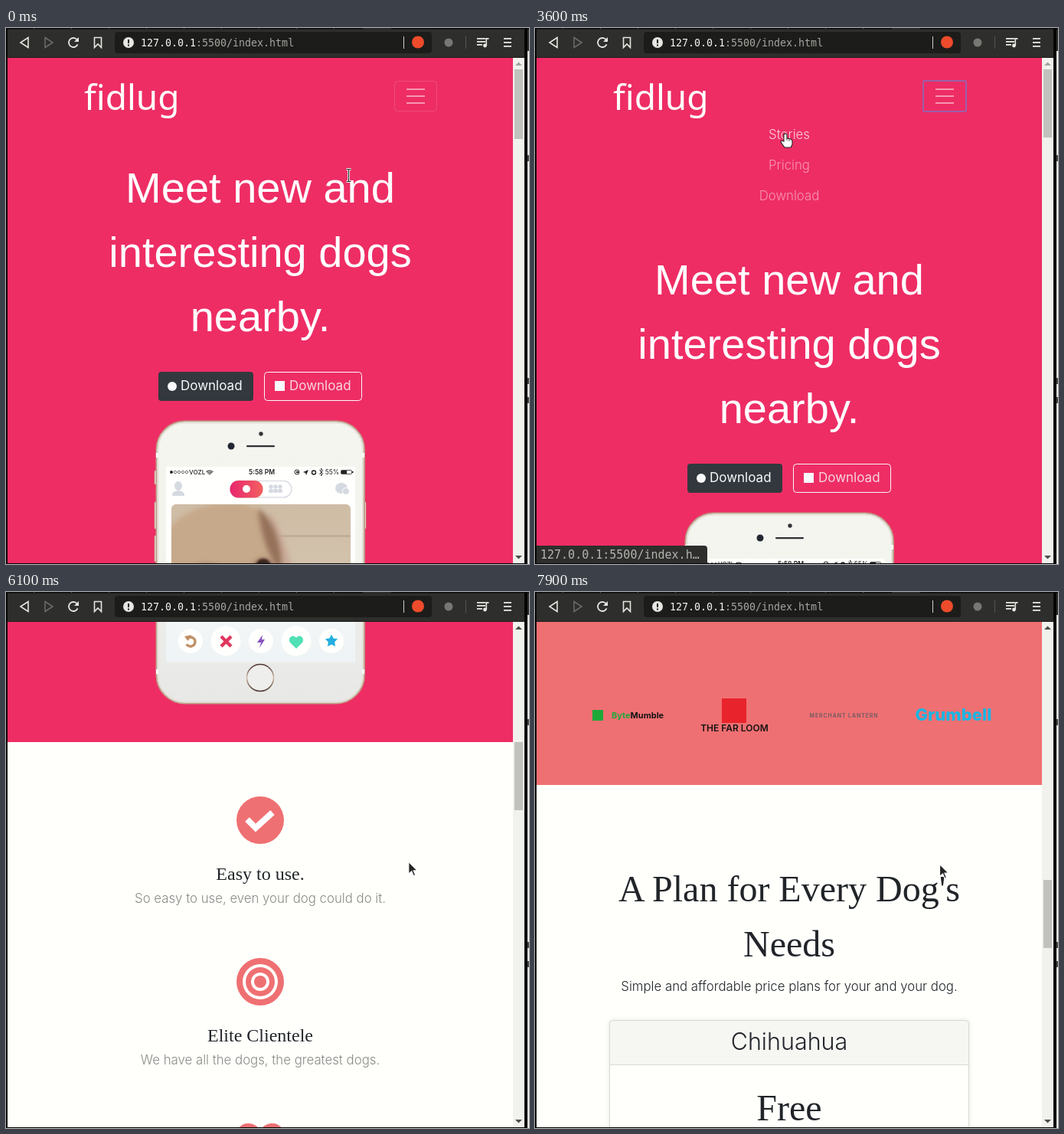
Animation of 683x700 px, one loop 8 s. Source, as an HTML page with a canvas:

```html
<!DOCTYPE html>
<html lang="en">
<head>
<meta charset="utf-8">
<title>Dog landing page</title>
<style>
html, body { margin: 0; width: 683px; height: 700px; overflow: hidden; background: #000; }
canvas { display: block; }
</style>
</head>
<body>
<canvas id="stage" width="683" height="700"></canvas>
<script>
const ctx = document.getElementById('stage').getContext('2d');
const LOOP = 8000, STEP = 100, MID = 332;
const PINK = '#ee2d65', CORAL = '#ef7072', PAPER = '#fffffb', INK = '#212529';
const SANS = 'Inter, sans-serif', SERIF = '"Liberation Serif", serif', MONO = '"DejaVu Sans Mono", monospace';
const BODY = '300 16.8px ' + SANS;

// Keyframes are [time, ...values].
const SCROLL = [[3900, 0], [4400, 150], [4500, 150], [4700, 209], [5600, 760], [5700, 790],
  [5800, 790], [6700, 1539], [7300, 2010], [7500, 2010], [7900, 2367]];
const MENU = [[1200, 0], [1300, 32], [1400, 94], [1500, 120]];
const POINTER = [[300, 447, 192], [400, 456, 172], [500, 456, 172], [700, 490, 130], [900, 519, 97],
  [2200, 519, 97], [2300, 425, 142], [2400, 330, 186], [2500, 330, 186], [2800, 400, 205],
  [3000, 475, 212], [3200, 400, 180], [3400, 345, 150], [3600, 327, 138], [3700, 327, 138],
  [3900, 400, 222], [4200, 470, 312], [4700, 482, 331], [5600, 523, 349], [6700, 528, 355]];

function track(keys, t) {
  const i = keys.findIndex(k => k[0] > t);
  if (i === 0) return keys[0].slice(1);
  if (i < 0) return keys[keys.length - 1].slice(1);
  const a = keys[i - 1], b = keys[i], p = (t - a[0]) / (b[0] - a[0]);
  return a.slice(1).map((v, n) => v + (b[n + 1] - v) * p);
}

function rect(x, y, w, h, fill, r = 0, stroke, lw = 1) {
  ctx.beginPath();
  ctx.roundRect(x, y, w, h, r);
  paint(fill, stroke, lw);
}
function oval(x, y, rx, fill, ry = rx, turn = 0, stroke, lw = 1) {
  ctx.beginPath();
  ctx.ellipse(x, y, rx, ry, turn, 0, Math.PI * 2);
  paint(fill, stroke, lw);
}
function poly(points, fill, stroke, lw = 1, open = false) {
  ctx.beginPath();
  for (let i = 0; i < points.length; i += 2) ctx.lineTo(points[i], points[i + 1]);
  if (!open) ctx.closePath();
  paint(fill, stroke, lw);
}
function shape(path, x, y, fill, stroke, lw = 1) {
  ctx.save();
  ctx.translate(x, y);
  const p = new Path2D(path);
  if (fill) { ctx.fillStyle = fill; ctx.fill(p); }
  if (stroke) { ctx.strokeStyle = stroke; ctx.lineWidth = lw; ctx.stroke(p); }
  ctx.restore();
}
function paint(fill, stroke, lw) {
  if (fill) { ctx.fillStyle = fill; ctx.fill(); }
  if (stroke) { ctx.strokeStyle = stroke; ctx.lineWidth = lw; ctx.stroke(); }
}
function text(str, x, y, font, color, align = 'center', spacing = 0) {
  ctx.font = font;
  ctx.fillStyle = color;
  ctx.textAlign = align;
  ctx.textRendering = 'optimizeLegibility'; // kerns across spaces too
  ctx.letterSpacing = spacing + 'px';
  ctx.fillText(str, x, y);
  ctx.letterSpacing = '0px';
}
function fade(y0, y1, ...colors) {
  const g = ctx.createLinearGradient(0, y0, 0, y1);
  colors.forEach((c, i) => g.addColorStop(i / (colors.length - 1), c));
  return g;
}

function drawNav(t, menu, hover) {
  text('fidlug', 102, 107, '46px "Noto Sans", sans-serif', PAPER, 'left');
  const focused = t >= 1100;
  if (focused) rect(507, 69, 56, 40, null, 2, '#9a5fa8', 2);
  else rect(507.5, 69.5, 55, 39, null, 4, 'rgba(255,255,255,.14)');
  for (const y of [79, 88, 97]) rect(523, y, 24, 2, 'rgba(255,255,255,.5)');
  if (!menu) return;
  ctx.save();
  ctx.beginPath();
  ctx.rect(90, 119, 480, menu);
  ctx.clip();
  ['Stories', 'Pricing', 'Download'].forEach((label, i) =>
    text(label, MID, 145 + i * 40, BODY, `rgba(255,255,255,${i === hover ? .78 : .5})`));
  ctx.restore();
}

function drawHero() {
  ['Meet new and', 'interesting dogs', 'nearby.'].forEach((line, i) =>
    text(line, MID, 348 + i * 84, '56px "Liberation Sans", sans-serif', '#fff'));
  rect(199, 569, 124, 38, '#32383e', 4);
  oval(217, 588, 6, '#f8f9fa');
  text('Download', 228, 593, '17px ' + SANS, '#f8f9fa', 'left');
  rect(337.5, 569.5, 127, 37, null, 4, '#f8f9fa');
  rect(351, 581, 13, 13, '#f8f9fa');
  text('Download', 370, 593, '17px ' + SANS, '#f8d5df', 'left');
}

function drawPhoto() {
  ctx.save();
  ctx.beginPath();
  ctx.roundRect(216, 109, 234, 335, 6);
  ctx.clip();
  rect(216, 109, 234, 335, fade(109, 444, '#cfbca5', '#d6c8b4', '#d0c1ac'));
  rect(340, 149, 110, 3, '#c2ae96');
  ctx.filter = 'blur(3px)';
  shape('M276 270C284 310 268 370 280 460H424C425 390 405 330 382 285Z', 0, 0, '#ba9985');
  shape('M312 345C318 380 306 410 318 460L304 460C300 410 308 380 312 345Z', 0, 0, '#a07d6b');
  shape('M342 120C356 130 364 165 377 200C402 235 408 275 396 306C375 310 360 270 352 230Z', 0, 0, '#c8a796');
  shape('M205 155C222 112 290 96 330 116C354 140 360 190 354 235C362 270 345 296 322 290C296 293 270 280 248 250C235 235 225 230 205 225Z',
    0, 0, '#c6a88a');
  shape('M329 115C346 125 363 160 359 198C345 180 334 155 329 115Z', 0, 0, '#95715a');
  oval(310, 222, 20, '#d0b498', 30, -.3);
  oval(262, 205, 25, '#97765f', 18);
  oval(336, 194, 14, '#8f6c57', 14);
  oval(330, 278, 19, '#72564b', 13);
  oval(332, 339, 27, 'rgba(181,121,112,.4)', 22);
  ctx.filter = 'blur(1.5px)';
  oval(263, 203, 16, '#38241f', 13);
  oval(336, 191, 10, '#3b2620', 11);
  oval(331, 260, 20, '#35282a', 17, -.3);
  oval(324, 254, 7, '#62504f', 3);
  ctx.filter = 'none';
  rect(216, 372, 234, 72, fade(372, 444, 'rgba(40,38,36,0)', 'rgba(40,38,36,.28)', 'rgba(40,38,36,.82)'));
  ctx.restore();
}

function drawStatusLine() {
  for (let i = 0; i < 5; i++) oval(216 + i * 5, 67, 1.7, i ? null : '#222', 1.7, 0, '#333', .7);
  text('VOZL', 239, 70, '500 8px ' + SANS, '#222', 'left');
  for (const r of [2, 4, 6]) {
    ctx.beginPath();
    ctx.arc(266, 71, r, -2.4, -.75);
    paint(null, '#222', 1.2);
  }
  text('5:58 PM', 334, 70, '600 8.5px ' + SANS, '#222');
  oval(380, 67, 3, null, 3, 0, '#222');
  rect(379, 66, 3, 2, '#222');
  poly([388, 67, 395, 64, 392, 71, 391, 68], '#222');
  oval(402, 67.5, 2.5, null, 2.5, 0, '#222', 1.4);
  poly([409, 64, 414, 69, 411.5, 72, 411.5, 62, 414, 65, 409, 70], null, '#222', .8, true);
  text('55%', 426, 70, '8.5px ' + SANS, '#222');
  rect(437.5, 64.5, 14, 5, null, 1, '#222', .8);
  rect(438, 65, 7, 4, '#222');
  rect(452, 66, 1.5, 2, '#222');
}

function drawPhoneButtons() {
  for (let i = 0; i < 5; i++) oval(241 + i * 46, 471, i % 2 ? 19.5 : 16, '#fffffd');
  ctx.beginPath();
  ctx.arc(241, 472, 6, -2.6, 2.6);
  paint(null, '#c09065', 3.4);
  poly([233, 465, 242, 463, 238, 471], '#c09065');
  poly([281, 465, 294, 478], null, '#e0375e', 4.4, true);
  poly([294, 465, 281, 478], null, '#e0375e', 4.4, true);
  poly([335, 463, 328, 473, 333, 473, 331, 480, 338, 469, 334, 469], '#8854c0');
  shape('M0 9L-8 1C-12-5-4-11 0-5C4-11 12-5 8 1Z', 379, 472, '#4fe0b4');
  const star = [];
  for (let i = 0; i < 10; i++) {
    const a = i * Math.PI / 5, r = i % 2 ? 4.4 : 8.5;
    star.push(425 + Math.sin(a) * r, 471 - Math.cos(a) * r);
  }
  poly(star, '#22afe0');
}

function drawPhone() {
  ctx.save();
  ctx.translate(0, 633);
  for (const [x, y, h] of [[194, 65, 18], [194, 106, 35], [194, 150, 34], [467, 106, 35]])
    rect(x, y, 3, h, '#e8ded0', 1, '#b99c88', .5);
  rect(196.5, .5, 271.5, 552, '#f3f3ee', 37, '#c0a08a', 2);
  rect(198.5, 2.5, 267.5, 548, fade(0, 550, '#f5f5f0', '#f3f3ee', '#e8e9e7'), 35, '#e3e0d9', 2);
  for (const x of [196, 465]) {
    rect(x, 42, 3, 6, '#fff');
    rect(x, 508, 3, 6, '#fff');
  }
  oval(333, 17, 2.7, '#343438');
  oval(294, 33, 4.5, '#232733');
  rect(314, 32, 37, 2.2, '#303034', 1);
  rect(209, 60, 247, 439, fade(60, 499, '#fffffd', '#fffffd', '#eef3f5'));
  drawStatusLine();
  oval(225, 85, 5, '#d5dae1', 6);
  shape('M217 98C217 92 221 92 225 91C229 92 233 92 233 98Z', 0, 0, '#d5dae1');
  rect(293, 78.5, 80, 21.5, '#fff', 11, '#dcdfe4', 1.5);
  const glow = ctx.createLinearGradient(293, 0, 336, 0);
  glow.addColorStop(0, '#e9266f');
  glow.addColorStop(1, '#f2625e');
  rect(292.5, 78, 43, 22.5, glow, 11);
  oval(314, 89, 5, '#fff');
  for (const x of [346, 358, 352]) {
    oval(x, 86, 2.7, '#d5dae1');
    rect(x - 3, 89, 6, 5, '#d5dae1', 2);
  }
  oval(438, 88, 8, '#d5dae1', 7);
  oval(444, 92, 4.5, '#d5dae1', 4.5, 0, '#fff');
  drawPhoto();
  drawPhoneButtons();
  oval(332, 519, 17.5, '#eeeeec', 17.5, 0, fade(501, 537, '#47302e', '#d9bfb0', '#47302e'), 1.6);
  ctx.restore();
}

function drawFeatures() {
  const features = [
    ['Easy to use.', 'So easy to use, even your dog could do it.'],
    ['Elite Clientele', 'We have all the dogs, the greatest dogs.'],
    ['Guaranteed to work.', "Find the love of your dog's life or your money back."]];
  features.forEach(([title, note], i) => {
    const y = 1338 + i * 211;
    text(title, MID, y + 78, '24px ' + SERIF, INK);
    text(note, MID, y + 108, BODY, '#8a8a87');
  });
  oval(MID, 1338, 31, CORAL);
  poly([315, 1337, 326, 1348, 348, 1328], null, '#fff', 8, true);
  [[31, CORAL], [23, PAPER], [19, CORAL], [12, PAPER], [8, CORAL]].forEach(([r, c]) => oval(MID, 1549, r, c));
  shape('M0 28Q-2 28-4 26L-27 3C-37-8-31-28-16-28C-8-28-4-24 0-20C4-24 8-28 16-28C31-28 37-8 27 3L4 26Q2 28 0 28Z',
    MID, 1762, CORAL);
}

function drawTestimonials() {
  ['I no longer have to sniff', "other dogs for love. I've", 'found the hottest Corgi', 'on Fidlug. Woof.'].forEach((line, i) =>
    text(line, MID, 2061 + i * 72, '48px ' + SERIF, '#fff'));
  oval(262, 2348, 23, '#c9aa8b');
  text('Pebbles, New York', 305, 2387, 'italic 17px ' + SANS, '#fff', 'left');
  for (const side of [-1, 1]) {
    const x = side < 0 ? 52 : 613;
    poly([x - 4 * side, 2192, x + 4 * side, 2200, x - 4 * side, 2208], null, 'rgba(255,255,255,.5)', 5, true);
  }
}

function drawPress() {
  rect(75, 2521, 14, 14, '#1fa83a');
  const bold = '700 11px ' + SANS;
  text('Byte', 100, 2532, bold, '#1fa83a', 'left');
  text('Mumble', 100 + ctx.measureText('Byte').width, 2532, bold, '#151515', 'left');
  rect(244, 2506, 32, 32, '#e8232c');
  text('THE FAR LOOM', 260.5, 2549, '600 12px ' + SANS, '#171313');
  text('MERCHANT LANTERN', 403.5, 2531, '600 7px ' + SANS, '#6b5a62', 'center', .9);
  text('Grumbell', 546.5, 2535, '800 22px ' + SANS, '#19b5e4');
}

function drawPricing() {
  text("A Plan for Every Dog's", MID, 2771, '48px ' + SERIF, INK);
  text('Needs', MID, 2843, '48px ' + SERIF, INK);
  text('Simple and affordable price plans for your and your dog.', MID, 2888, BODY, INK);
  ctx.save();
  ctx.shadowColor = 'rgba(0,0,0,.1)';
  ctx.shadowBlur = 6;
  rect(97, 2926, 470, 330, PAPER, 4);
  ctx.restore();
  rect(97, 2926, 470, 58, '#f6f6f3', [4, 4, 0, 0]);
  rect(97, 2984, 470, 1, '#d8d8d5');
  rect(97.5, 2926.5, 469, 330, null, 4, '#d8d8d5');
  text('Chihuahua', MID, 2965, '300 30.5px ' + SANS, INK);
  text('Free', MID, 3057, '48px ' + SERIF, INK);
}

function drawPage(t, scroll, menu, hover) {
  ctx.save();
  ctx.beginPath();
  ctx.rect(2, 39, 660, 660);
  ctx.clip();
  ctx.fillStyle = PAPER;
  ctx.fillRect(2, 39, 660, 660);
  ctx.translate(0, -Math.round(scroll));
  rect(2, 39, 660, 1197 + menu - 120, PINK);
  drawNav(t, menu, hover);
  ctx.translate(0, menu - 120);
  drawHero();
  drawPhone();
  drawFeatures();
  rect(2, 1963, 660, 656, CORAL);
  drawTestimonials();
  drawPress();
  drawPricing();
  ctx.restore();
}

function drawScrollbar(scroll, menu) {
  rect(662, 39, 15, 660, '#f1f1ed');
  rect(664, Math.round(54 + scroll / 7.34), 11, Math.round(91 - menu / 60), '#c1c1bd');
  poly([665, 49, 669.5, 44.5, 674, 49], scroll ? '#4b4b49' : '#a3a3a0');
  poly([665, 689, 669.5, 693.5, 674, 689], '#4b4b49');
}

function drawChrome() {
  rect(0, 0, 683, 39, '#2e2f2c');
  rect(0, 0, 683, 1.5, '#0b0b0a');
  for (let x = 36; x < 460; x += 49) rect(x, 0, 1, 1, '#666');
  rect(466, 0, 37, 1.5, '#2e2f2c');
  rect(0, 38, 680, 1, '#1d1d1b');
  const light = '#e6e6e2';
  poly([29, 12.5, 29, 25.5, 19, 19], null, light, 1.6);
  poly([51, 12.5, 51, 25.5, 61, 19], null, '#6c6c69', 1.5);
  ctx.beginPath();
  ctx.arc(88, 19, 6, .4, 5.6);
  paint(null, light, 1.8);
  poly([95, 12, 95, 18, 89, 18], light);
  poly([115.5, 12.5, 124.5, 12.5, 124.5, 25.5, 120, 21, 115.5, 25.5], null, light, 1.6);
  rect(142, 5, 414, 28, '#1c1d1a', 4);
  oval(160, 19, 7, light);
  rect(159, 15, 2, 5, '#1c1d1a');
  rect(159, 21.5, 2, 2, '#1c1d1a');
  const url = '13.3px ' + MONO;
  text('127.0.0.1', 176, 24, url, '#f4f4f0', 'left');
  text(':5500/index.html', 176 + ctx.measureText('127.0.0.1').width, 24, url, '#a5a5a1', 'left');
  rect(519, 11, 1, 16, '#d0d0cc');
  oval(538, 18.5, 8, '#ee4b2c');
  oval(578, 19, 5.5, '#777774');
  rect(600, 11, 1, 16, '#565653');
  for (const [y, w] of [[13, 11], [17, 11], [21, 7]]) rect(615, y, w, 1.8, light);
  oval(625.5, 23, 2.4, light);
  rect(626.5, 13, 1.6, 10, light);
  rect(626.5, 13, 4, 1.8, light);
  for (const y of [13, 18, 23]) rect(650, y, 10, 1.8, light);
  rect(0, 0, 2, 700, '#050505');
  rect(0, 699, 683, 1, '#050505');
  rect(677, 0, 4, 700, '#050505');
  rect(681, 30, 2, 670, '#e4e4e1');
  for (const y of [166, 457, 482]) rect(681, y, 2, 8, '#4a4a48');
}

function drawStatusBubble() {
  rect(2, 676, 223, 23, '#2e2f2c', [0, 4, 0, 0]);
  text('127.0.0.1:5500/index.h…', 7, 693, '15px ' + MONO, '#b4b4b0', 'left');
}

function drawPointer(kind, x, y) {
  if (kind === 'text') {
    const beam = 'M-3-8H-1Q0-8 0-7Q0-8 1-8H3M0-7V7M-3 8H-1Q0 8 0 7Q0 8 1 8H3';
    shape(beam, x + .5, y + .5, null, '#fff', 3);
    shape(beam, x + .5, y + .5, null, '#222', 1.2);
  } else if (kind === 'hand') {
    shape('M-2 1Q0-1 2 1V6L7 7Q9 8 9 10V14L7 18H-1L-6 11Q-6 8-2 10Z', x, y, '#fff', '#222', 1.1);
    shape('M2 6V9M5 7V10', x, y, null, '#222', .8);
  } else {
    shape('M0 0V16L4 12.5L6.5 18.5L9 17.5L6.5 11.5H11.5Z', x + .5, y + .5, '#252525', '#fff', 1.2);
  }
}

function draw(now) {
  const t = Math.floor(now % LOOP / STEP) * STEP;
  const [scroll] = track(SCROLL, t), [menu] = track(MENU, t), [x, y] = track(POINTER, t);
  const linked = t >= 2400 && t < 3900;
  const hover = linked ? Math.floor((y - 119) / 40) : -1;
  drawChrome();
  drawPage(t, scroll, menu, hover);
  drawScrollbar(scroll, menu);
  if (linked && t >= 2600) drawStatusBubble();
  drawPointer(t < 400 ? 'text' : linked ? 'hand' : 'arrow', x, y);
}

const start = performance.now();
function tick() {
  draw(performance.now() - start);
  requestAnimationFrame(tick);
}
tick();
</script>
</body>
</html>
```
